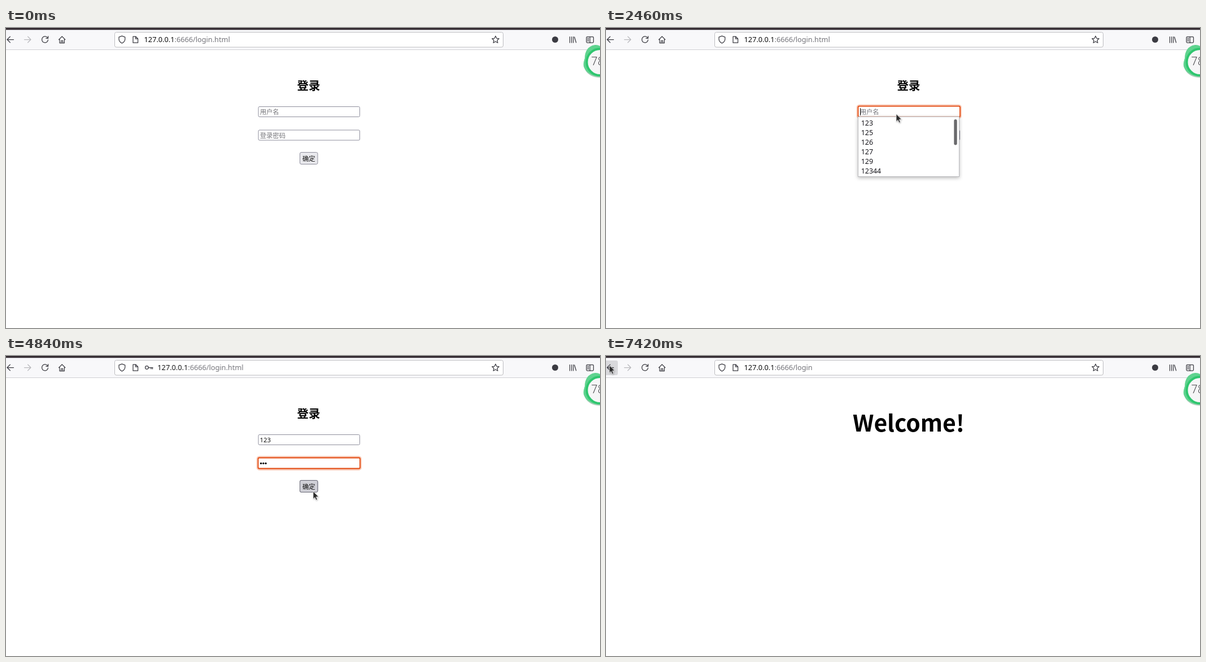
An HTML page that plays this animation: 1052 px wide and 532 px high, repeating every 8000 ms.

```html
<!DOCTYPE html>
<html lang="zh-CN">
<head>
<meta charset="utf-8">
<title>登录</title>
<style>
html, body { margin: 0; width: 100%; height: 100%; overflow: hidden; background: #fff; }
svg { display: block; width: 1052px; height: 532px; font-family: "Noto Sans", "Noto Sans CJK SC", sans-serif; }
.icon { fill: none; stroke: #3b3b42; stroke-width: 1.25; stroke-linecap: round; stroke-linejoin: round; }
.thin { stroke: #6c6c72; stroke-width: 1; }
.url { font-size: 12.72px; fill: #737379; }
.host { fill: #0c0c0d; font-weight: 500; }
.ui { font-size: 12.35px; fill: #15141a; }
.field { font-size: 11.33px; fill: #111; }
.num { font-weight: 500; }
.hint { fill: #75757a; }
.box { fill: #fff; stroke: #8f8f9d; }
.line { fill: #fff; stroke: #bcbcc0; }
.bold { font-weight: 700; }
.under { text-decoration: underline; }
.halo { fill: none; stroke: #f9cbb8; stroke-width: 3; }
.ring { fill: #fff; stroke: #e2460c; stroke-width: 1.8; }

/* One 8 s loop; 1% is 80 ms. */
.k { opacity: 0; }
.k, .shift, .html, #cursor { animation: 8s step-end infinite; }
.form { animation-name: form; }
.hover { animation-name: hover; }
.user-focus { animation-name: user-focus; }
.user-hint { animation-name: user-hint; }
.user-text { animation-name: user-text; }
.user-caret { animation-name: user-caret; }
.menu { animation-name: menu; }
.pick { animation-name: pick; }
.pass-hint { animation-name: pass-hint; }
.pass-focus { animation-name: pass-focus; }
.dot1 { animation-name: dot1; }
.dot2 { animation-name: dot2; }
.dot3 { animation-name: dot3; }
.ok-hover { animation-name: ok-hover; }
.ok-down { animation-name: ok-down; }
.key { animation-name: key; }
.shift { animation-name: shift; }
.html { animation-name: html; }
.reload { animation-name: reload; }
.stop { animation-name: stop; }
.welcome { animation-name: welcome; }
.popup { animation-name: popup; }
.skip { animation-name: skip; }
.back { animation-name: back; }
.hand { animation-name: hand; }
.arrow { animation-name: arrow; }
.beam { animation-name: beam; }
#cursor { animation-name: move; }

@keyframes form { 0% { opacity: 1 } 66.6% { opacity: 0 } }
@keyframes hover { 16.7% { opacity: 1 } 30.7% { opacity: 0 } }
@keyframes user-focus { 30.7% { opacity: 1 } 44.25% { opacity: 0 } }
@keyframes user-hint { 0% { opacity: 1 } 39.7% { opacity: 0 } }
@keyframes user-text { 39.7%, to { opacity: 1 } }
@keyframes user-caret { 39.7% { opacity: 1 } 44.25% { opacity: 0 } }
@keyframes menu { 30.7% { opacity: 1 } 39.7% { opacity: 0 } }
@keyframes pick { 36.6% { opacity: 1 } 39.7% { opacity: 0 } }
@keyframes pass-hint { 0% { opacity: 1 } 46% { opacity: 0 } }
@keyframes pass-focus { 44.25% { opacity: 1 } 63.75% { opacity: 0 } }
@keyframes dot1 { 46%, to { opacity: 1 } }
@keyframes dot2 { 47.25%, to { opacity: 1 } }
@keyframes dot3 { 48.5%, to { opacity: 1 } }
@keyframes ok-hover { 58.75% { opacity: 1 } 66.6% { opacity: 0 } }
@keyframes ok-down { 63.75% { opacity: 1 } 64.7% { opacity: 0 } }
@keyframes key { 46% { opacity: 1 } 80% { opacity: 0 } }
@keyframes shift { 46% { transform: translateX(23.7px) } 80% { transform: none } }
@keyframes html { 66.6%, to { fill: transparent } }
@keyframes reload { 0% { opacity: 1 } 65.7% { opacity: 0 } 68.2%, to { opacity: 1 } }
@keyframes stop { 65.7% { opacity: 1 } 68.2% { opacity: 0 } }
@keyframes welcome { 67.4%, to { opacity: 1 } }
@keyframes popup { 67.4% { opacity: .5 } 68.2% { opacity: 1 } 80% { opacity: 0 } }
@keyframes skip { 75% { opacity: 1 } 80% { opacity: 0 } }
@keyframes back { 90.9%, to { opacity: 1 } }
@keyframes hand { .875% { opacity: 1 } 9.3% { opacity: 0 } }
@keyframes arrow {
  9.3% { opacity: 1 } 16.7% { opacity: 0 }
  30.7% { opacity: 1 } 42.5% { opacity: 0 }
  56.4%, to { opacity: 1 }
}
@keyframes beam { 16.7% { opacity: 1 } 30.7% { opacity: 0 } 42.5% { opacity: 1 } 56.4% { opacity: 0 } }
@keyframes move {
  0% { transform: translate(971px, 497px) }
  .875% { transform: translate(971px, 497px); animation-timing-function: steps(3) }
  3.5% { transform: translate(800px, 390px); animation-timing-function: steps(3) }
  6% { transform: translate(600px, 250px); animation-timing-function: steps(3) }
  8.45% { transform: translate(506px, 183px) }
  9.3% { transform: translate(491px, 174px) }
  10.3% { transform: translate(503px, 169px) }
  11% { transform: translate(508px, 158px) }
  11.8% { transform: translate(513px, 150px) }
  16.7% { transform: translate(513px, 150.5px) }
  24.1% { transform: translate(514px, 150.5px) }
  26.6% { transform: translate(513.5px, 150.5px) }
  30.7% { transform: translate(514px, 152.5px) }
  36.6% { transform: translate(504px, 166px) }
  39.7% { transform: translate(503.5px, 169px) }
  41.3% { transform: translate(503.5px, 169px); animation-timing-function: steps(3) }
  44% { transform: translate(498px, 190px) }
  55.5% { transform: translate(498px, 190px); animation-timing-function: steps(5) }
  59.5% { transform: translate(544px, 240px) }
  70.1% { transform: translate(544px, 240px); animation-timing-function: steps(2) }
  71.7% { transform: translate(524px, 241px) }
  72.7% { transform: translate(524px, 241px); animation-timing-function: steps(6) }
  78% { transform: translate(463px, 270px) }
  85.75% { transform: translate(463px, 270px); animation-timing-function: steps(6) }
  90.9% { transform: translate(13px, 5px) }
  92.7%, to { transform: translate(6px, 16.5px) }
}
</style>
</head>
<body>
<svg viewBox="0 0 1052 532">
  <defs>
    <filter id="soft" x="-20%" y="-20%" width="140%" height="150%">
      <feDropShadow dx="0" dy="2" stdDeviation="3" flood-opacity=".28"/>
    </filter>
    <filter id="glow" x="-5%" y="-5%" width="110%" height="110%">
      <feDropShadow dx="0" dy="0" stdDeviation="1.2" flood-opacity=".2"/>
    </filter>
    <filter id="tiny" x="-50%" y="-50%" width="200%" height="200%">
      <feDropShadow dx=".5" dy="1" stdDeviation=".8" flood-opacity=".35"/>
    </filter>
  </defs>
  <rect width="1052" height="532" fill="#fff"/>

  <!-- toolbar -->
  <rect width="1052" height="38" fill="#f8f8fa"/>
  <rect width="1052" height="3.3" fill="#342c32"/>
  <rect y="38" width="1052" height="1" fill="#cfcfd3"/>
  <rect class="k back" x="-4" y="8" width="25" height="26" rx="3" fill="#d9d9dc"/>
  <g class="icon">
    <path d="M13.5 20.5H2M7.3 15.2L2 20.5l5.3 5.3"/>
    <path stroke="#b9b9bd" d="M32.5 20.5H44M38.7 15.2l5.3 5.3-5.3 5.3"/>
    <path class="k reload" d="M73.6 17.4A5.5 5.5 0 1 0 74.5 21M74.6 14.5v3.8h-3.8"/>
    <path class="k stop" d="M64.5 16l9 9M73.5 16l-9 9"/>
    <path d="M93.5 20.6L99.2 15l5.7 5.6M95 19.8v6.7h8.4v-6.7M97.8 26.3v-3.6h2.8v3.6"/>
  </g>
  <rect class="line" x="192.5" y="7.5" width="688" height="26.5" rx="3"/>
  <g class="icon">
    <path d="M205.4 14.2l5.4 2v3.2q0 4.8-5.4 7.6-5.4-2.8-5.4-7.6v-3.2z"/>
    <path d="M225 15h4.6l4 4v7.2H225zM229.5 15.2v4h4"/>
    <path d="M867 14.2l1.9 4.1 4.4.5-3.3 3 .9 4.5-3.9-2.3-3.9 2.3.9-4.5-3.3-3 4.4-.5z"/>
    <path d="M998.5 15.5v10.5M1001.7 15.5v10.5M1004.8 15.5v10.5M1006.7 16l3 9.8"/>
    <rect x="1028" y="15.5" width="12.5" height="10.5" rx="1.5"/>
    <path d="M1034.2 15.5v10.5M1030 18.3h2M1030 20.6h2M1030 22.9h2"/>
  </g>
  <circle cx="972.5" cy="20.5" r="5.5" fill="#3b3b42"/>
  <rect class="k popup" x="242" y="8" width="23" height="26" fill="#e6e6e8"/>
  <g class="k key">
    <g class="icon"><circle cx="249.4" cy="20.5" r="2.8"/><path d="M252.2 20.5H260M257 20.5v2.4M259.5 20.5v2.4"/></g>
  </g>
  <g class="shift">
    <text class="url" x="244.6" y="25"><tspan class="host">127.0.0.1</tspan>:6666/login<tspan class="html">.html</tspan></text>
  </g>

  <!-- login page -->
  <g class="k form">
    <text class="bold" x="536" y="110" font-size="20.4" text-anchor="middle">登录</text>

    <rect class="box" x="447" y="139.5" width="179.5" height="18" rx="2"/>
    <rect class="k hover" x="447" y="139.5" width="179.5" height="18" rx="2" fill="none" stroke="#676774"/>
    <g class="k user-focus">
      <rect class="halo" x="445" y="137" width="183.5" height="22.5" rx="4"/>
      <rect class="ring" x="446.5" y="138.7" width="180.5" height="19" rx="2"/>
    </g>
    <text class="field hint k user-hint" x="449.7" y="152.8">用户名</text>
    <text class="field num k user-text" x="449.5" y="152.8">123</text>
    <path class="k menu" d="M450.5 142v13" stroke="#111"/>
    <path class="k user-caret" d="M469.5 142v13" stroke="#111"/>

    <rect class="box" x="447" y="181" width="179.5" height="18" rx="2"/>
    <g class="k pass-focus">
      <rect class="halo" x="445" y="178.7" width="183.5" height="22.7" rx="4"/>
      <rect class="ring" x="446.5" y="180.5" width="180.5" height="19" rx="2"/>
    </g>
    <text class="field hint k pass-hint" x="449.7" y="194.8">登录密码</text>
    <circle class="k dot1" cx="451.6" cy="190.4" r="1.65"/>
    <circle class="k dot2" cx="455.8" cy="190.4" r="1.65"/>
    <circle class="k dot3" cx="460" cy="190.4" r="1.65"/>

    <rect x="520.5" y="220.5" width="31.5" height="21" rx="2.5" fill="#e9e9ed" stroke="#8f8f9d"/>
    <rect class="k ok-hover" x="520.5" y="220.5" width="31.5" height="21" rx="2.5" fill="#d0d0d7" stroke="#676774"/>
    <rect class="k ok-down" x="520.5" y="220.5" width="31.5" height="21" rx="2.5" fill="#b1b1b9" stroke="#484851"/>
    <text class="field" x="536.3" y="236.2" text-anchor="middle">确定</text>
  </g>

  <!-- suggestions -->
  <g class="k menu">
    <rect x="446.5" y="157.5" width="179" height="106" fill="#fff" stroke="#b8b8bc" filter="url(#soft)"/>
    <rect class="k pick" x="447" y="160" width="167" height="17" fill="#e3e3e6"/>
    <g class="ui num">
      <text x="451.8" y="173">123</text>
      <text x="451.8" y="190">125</text>
      <text x="451.8" y="207">126</text>
      <text x="451.8" y="224">127</text>
      <text x="451.8" y="241">129</text>
      <text x="451.8" y="258">12344</text>
    </g>
    <rect x="616.3" y="162" width="5.4" height="45.5" rx="2.7" fill="#6a6a6c"/>
  </g>

  <text class="k welcome bold" x="536" y="133.5" font-size="40.8" text-anchor="middle" font-family="'Noto Sans CJK SC', sans-serif">Welcome!</text>

  <!-- save prompt -->
  <g class="k popup">
    <rect x="243.5" y="33" width="388.5" height="256.5" rx="5" fill="#fff" stroke="#c8c8cb" filter="url(#glow)"/>
    <g class="ui">
      <text class="bold" x="257.7" y="62.3">要保存 http://127.0.0.1:6666 的登录信息吗?</text>
      <text x="257.7" y="99.5">用户名</text>
      <rect class="line" x="257.5" y="107" width="360" height="27.5" rx="3"/>
      <text class="num" x="264" y="125.7">123</text>
      <path class="icon thin" d="M602.5 119.7l3.5 3.4 3.5-3.4"/>
      <text x="257.7" y="165.8">密码</text>
      <rect class="line" x="257.5" y="173.5" width="360" height="27.5" rx="3"/>
      <circle cx="266.6" cy="187.6" r="1.8"/>
      <circle cx="271.1" cy="187.6" r="1.8"/>
      <circle cx="275.6" cy="187.6" r="1.8"/>
      <rect x="258" y="219.5" width="13" height="13" rx="1.5" fill="#fff" stroke="#d8d8dc"/>
      <text x="277.7" y="231.7" font-size="12.5" fill="#5b5b62">显示密码(<tspan class="under">H</tspan>)</text>
      <g fill="#e0e0e1">
        <path d="M431 247.5h81.5V275H431a3 3 0 0 1-3-3v-21.5a3 3 0 0 1 3-3z"/>
        <path d="M513.5 247.5h24a3 3 0 0 1 3 3V272a3 3 0 0 1-3 3h-24z"/>
        <rect x="547" y="247.5" width="71" height="27.5" rx="3"/>
      </g>
      <path class="k skip" fill="#cfcfd2" d="M431 247.5h81.5V275H431a3 3 0 0 1-3-3v-21.5a3 3 0 0 1 3-3z"/>
      <path class="icon" d="M522.3 259.5l4.7 4.6 4.7-4.6"/>
      <g class="bold" text-anchor="middle" font-size="12.6">
        <text x="470.8" y="266.3">不保存(<tspan class="under">D</tspan>)</text>
        <text x="583" y="266.3">保存(<tspan class="under">S</tspan>)</text>
      </g>
    </g>
  </g>

  <!-- floating badge -->
  <path fill="#a9cdb8" d="M1052 40H1030Q1020 62 1025 73C1030 84 1042 88 1052 88z"/>
  <path fill="#5fd38f" d="M1052 32Q1048 29.5 1043 30C1030 32 1025 42 1025 54C1022 62 1022 68 1025 72C1030 82 1042 86 1052 86z"/>
  <circle cx="1052" cy="60.5" r="23.5" fill="#f6f6f7" stroke="#2fc66f" stroke-width="4"/>
  <text x="1036.3" y="66.3" font-family="'Open Sans', sans-serif" font-weight="300" font-size="20" fill="#3f3f44">78</text>

  <!-- pointer -->
  <g id="cursor">
    <path class="k hand" fill="#fff" stroke="#222" stroke-linejoin="round" d="M-1.6 11V1.4a1.6 1.6 0 0 1 3.2 0V7.5q1.5-1 2.2.6 1.5-.6 2.1.9 1.8-.3 1.8 1.6V14q0 2-1.5 3.5v2H-.8V18Q-3 15-4.6 11.5-5 9.5-3 9.8z"/>
    <path class="k arrow" fill="#2a2a2c" stroke="#fff" stroke-width=".7" filter="url(#tiny)" d="M0 0V13.5L3 10.7 5.1 15.5 7.4 14.5 5.3 9.8H9.6z"/>
    <path class="k beam" fill="none" stroke="#222" stroke-width="1.2" d="M-3-8.5Q0-8.5 0-6.5Q0-8.5 3-8.5M0-6.5V6.5M-3 8.5Q0 8.5 0 6.5Q0 8.5 3 8.5"/>
  </g>
</svg>
</body>
</html>
```
